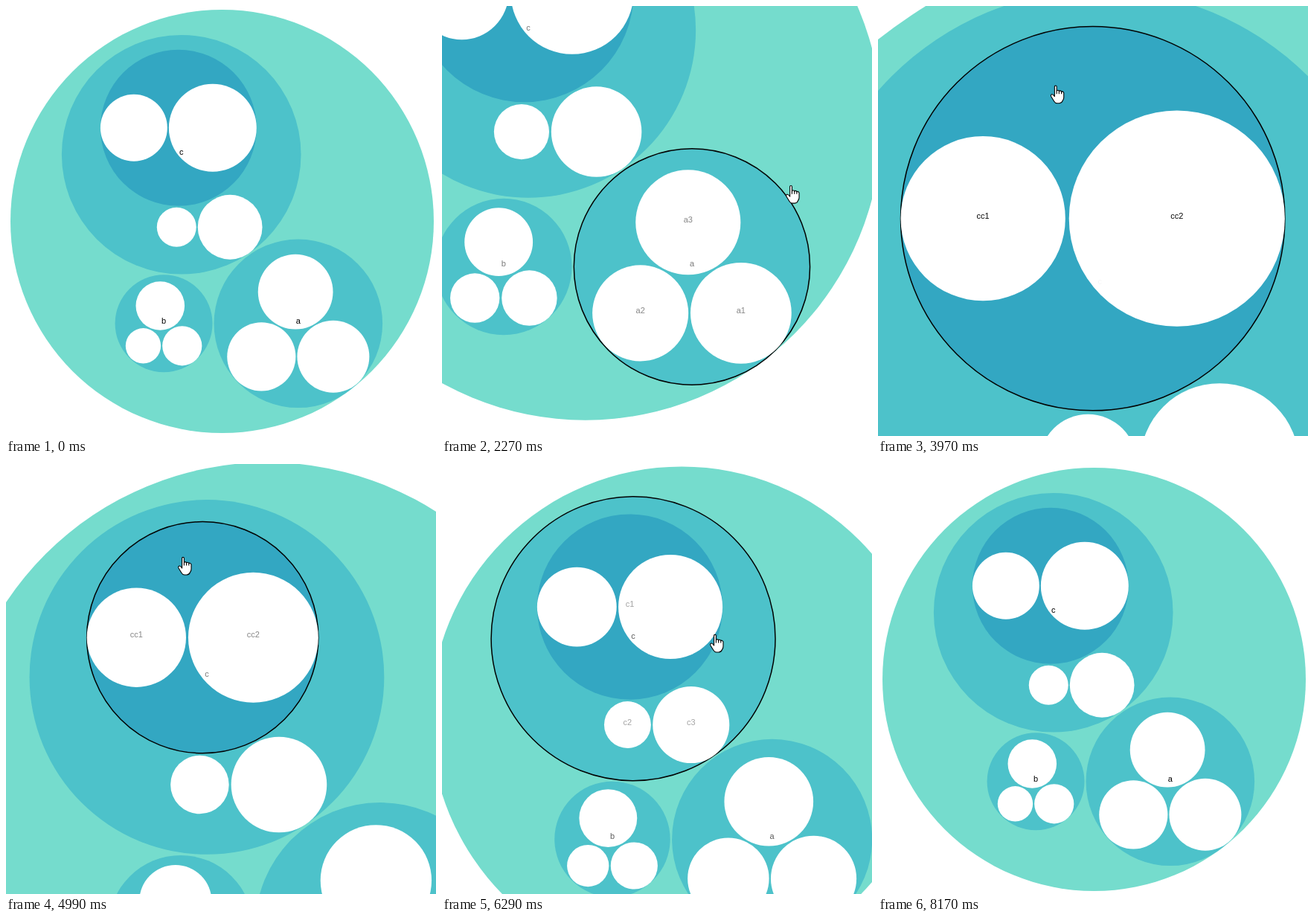
These frames come from a looping animation (578x578 px, 8470 ms). An HTML page:

```html
<!DOCTYPE html>
<html lang="en">
<head>
<meta charset="utf-8">
<title>Zoomable circle packing</title>
<style>
  html, body { margin: 0; width: 100%; height: 100%; overflow: hidden; background: #fff; }
  svg { display: block; width: 578px; height: 578px; }
  text { font: 11px "Liberation Sans", Arial, sans-serif; text-anchor: middle; }
  .pointer { fill: #fff; stroke: #000; stroke-width: 1.1; stroke-linejoin: round; }
</style>
</head>
<body>
<svg viewBox="0 0 578 578">
  <g id="circles"></g>
  <g id="labels"></g>
  <path id="arrow" class="pointer" d="M0 0V16.5L3.8 13L6.4 18.8L8.7 17.8L6.2 12H11.5Z"/>
  <path id="hand" class="pointer" d="M-1.4 14V1.8Q-1.4 .4 0 .4T1.4 1.8V8Q1.6 6.6 3 6.6T4.6 8.2Q4.8 7.2 6.2 7.2T7.8 9Q8.2 8 9.3 8.2T11 10V16Q11 18.5 9.5 20.5Q8.6 23.6 5 24H2Q-.5 24 -2 21.5L-6 15Q-7 13.2 -5.6 12.2Q-4 11.6 -2.6 13.4L-1.4 15ZM1.4 8V11.5M4.6 8V11.5M7.8 9V11.5"/>
</svg>
<script>
const LOOP = 8470, ZOOM_TIME = 750, HOVER_LAG = 100;
const MARGIN = 19.5, SPAN = 588.5, GAP = 1;
const CENTER = { x: 290.5, y: 289.5 };
const FILLS = ['#75dccd', '#4dc2ca', '#33a7c2'];

// Leaves hold their radius; groups get theirs from the packing
const tree = {
  a: { a1: 48.5, a2: 46.1, a3: 50.4 },
  b: { b1: 23.7, b2: 26.6, b3: 32.8 },
  c: { c1: { cc1: 45, cc2: 59 }, c2: 26.5, c3: 43.4 }
};

// Start time and circle to focus
const zooms = [[673, 'a'], [1890, 'root'], [3380, 'c1'], [4610, 'root'], [5955, 'c'], [7400, 'root']];

// Pointer moves: start, end, x, y
const visible = [70, 7700], entry = { x: 504, y: 557 };
const glides = [
  [70, 470, 470, 403], [1300, 1650, 477, 246], [2250, 2880, 239, 101], [3900, 4200, 238, 125],
  [5380, 5810, 367, 229], [6640, 6900, 553, 403], [7000, 7220, 563.5, 448]
];

const clamp = x => Math.min(1, Math.max(0, x));
const mix = (a, b, f) => a + (b - a) * f;
const ease = x => x < .5 ? 4 * x ** 3 : 1 - 4 * (1 - x) ** 3;

// Two circles side by side, a third resting on top, then a circle around all
function pack(kids) {
  kids.sort((p, q) => p.r - q.r);
  const [a, b, c] = kids;
  const ra = a.r + GAP, rb = b.r + GAP;
  a.dx = -ra; b.dx = rb; a.dy = b.dy = 0;
  if (c) {
    const ac = ra + c.r + GAP, bc = rb + c.r + GAP, ab = ra + rb;
    const along = (ac * ac - bc * bc + ab * ab) / (2 * ab);
    c.dx = a.dx + along;
    c.dy = -Math.sqrt(ac * ac - along * along);
  }
  const middle = key =>
    (Math.min(...kids.map(k => k[key] - k.r)) + Math.max(...kids.map(k => k[key] + k.r))) / 2;
  const mx = middle('dx'), my = middle('dy');
  for (const k of kids) { k.dx -= mx; k.dy -= my; }
  return Math.max(...kids.map(k => Math.hypot(k.dx, k.dy) + k.r));
}

function build(name, data, parent, depth) {
  const n = { name, parent, depth, kids: [] };
  if (typeof data === 'number') n.r = data;
  else {
    n.kids = Object.keys(data).map(key => build(key, data[key], name, depth + 1));
    n.r = pack(n.kids);
  }
  return n;
}

const nodes = [];
function locate(n, x, y) {
  nodes.push(Object.assign(n, { x, y }));
  n.kids.forEach(k => locate(k, x + k.dx, y + k.dy));
}
locate(build('root', tree, '', 0), CENTER.x, CENTER.y);

const byName = name => nodes.find(n => n.name === name);

// Smooth zoom and pan between two circles (van Wijk and Nuij, rho squared = 2)
function zoomPath(p, q) {
  const w0 = 2 * p.r + MARGIN, w1 = 2 * q.r + MARGIN;
  const dx = q.x - p.x, dy = q.y - p.y, d = Math.hypot(dx, dy);
  const diff = w1 * w1 - w0 * w0, dd = 4 * d * d;
  const r0 = Math.asinh(-(diff + dd) / (4 * w0 * d));
  const r1 = Math.asinh(-(diff - dd) / (4 * w1 * d));
  return t => {
    const s = mix(r0, r1, t);
    const u = w0 / (2 * d) * (Math.cosh(r0) * Math.tanh(s) - Math.sinh(r0));
    return { x: p.x + u * dx, y: p.y + u * dy, k: SPAN * Math.cosh(s) / (w0 * Math.cosh(r0)) };
  };
}

const moves = zooms.map(([start, to], i) => {
  const from = i ? zooms[i - 1][1] : 'root';
  return { start, from, to, path: zoomPath(byName(from), byName(to)) };
});

function stateAt(t) {
  const move = moves.filter(m => t >= m.start).pop() || moves[0];
  const e = ease(clamp((t - move.start) / ZOOM_TIME));
  return { move, e, view: move.path(e) };
}

function pointerAt(t) {
  let { x, y } = entry;
  for (const [start, end, tx, ty] of glides) {
    const f = clamp((t - start) / (end - start));
    x = mix(x, tx, f);
    y = mix(y, ty, f);
  }
  return { x, y, shown: t >= visible[0] && t < visible[1] };
}

const place = (n, v) => ({
  x: CENTER.x + (n.x - v.x) * v.k,
  y: CENTER.y + (n.y - v.y) * v.k,
  r: n.r * v.k
});

// Deepest inner group under the pointer
function pick(pos, view) {
  if (!pos.shown) return undefined;
  return nodes.filter(n => {
    const c = place(n, view);
    return n.parent && n.kids.length && Math.hypot(pos.x - c.x, pos.y - c.y) < c.r;
  }).pop();
}

function add(tag, group) {
  const el = document.createElementNS('http://www.w3.org/2000/svg', tag);
  return document.getElementById(group).appendChild(el);
}

function set(el, attrs) {
  for (const key in attrs) el.setAttribute(key, attrs[key]);
}

for (const n of nodes) {
  n.circle = add('circle', 'circles');
  set(n.circle, { fill: n.kids.length ? FILLS[n.depth] : '#fff', 'stroke-width': 1.5 });
  if (n.parent) {
    n.label = add('text', 'labels');
    n.label.textContent = n.name;
  }
}

const arrow = document.getElementById('arrow'), hand = document.getElementById('hand');

function draw(t) {
  const { move, e, view } = stateAt(t);
  const pos = pointerAt(t);
  const hover = pick(pos, stateAt(t - HOVER_LAG).view);

  for (const n of nodes) {
    const c = place(n, view);
    set(n.circle, { cx: c.x, cy: c.y, r: c.r, stroke: n === hover ? '#000' : 'none' });
    if (!n.label) continue;
    const alpha = mix(n.parent === move.from, n.parent === move.to, e);
    set(n.label, { x: c.x, y: c.y, 'fill-opacity': alpha });
  }

  const show = (el, on) => set(el, {
    transform: `translate(${pos.x} ${pos.y})`,
    visibility: pos.shown && on ? 'visible' : 'hidden'
  });
  show(arrow, !hover);
  show(hand, hover);
}

const begin = performance.now();
function tick() {
  draw((performance.now() - begin) % LOOP);
  requestAnimationFrame(tick);
}
tick();
</script>
</body>
</html>
```
